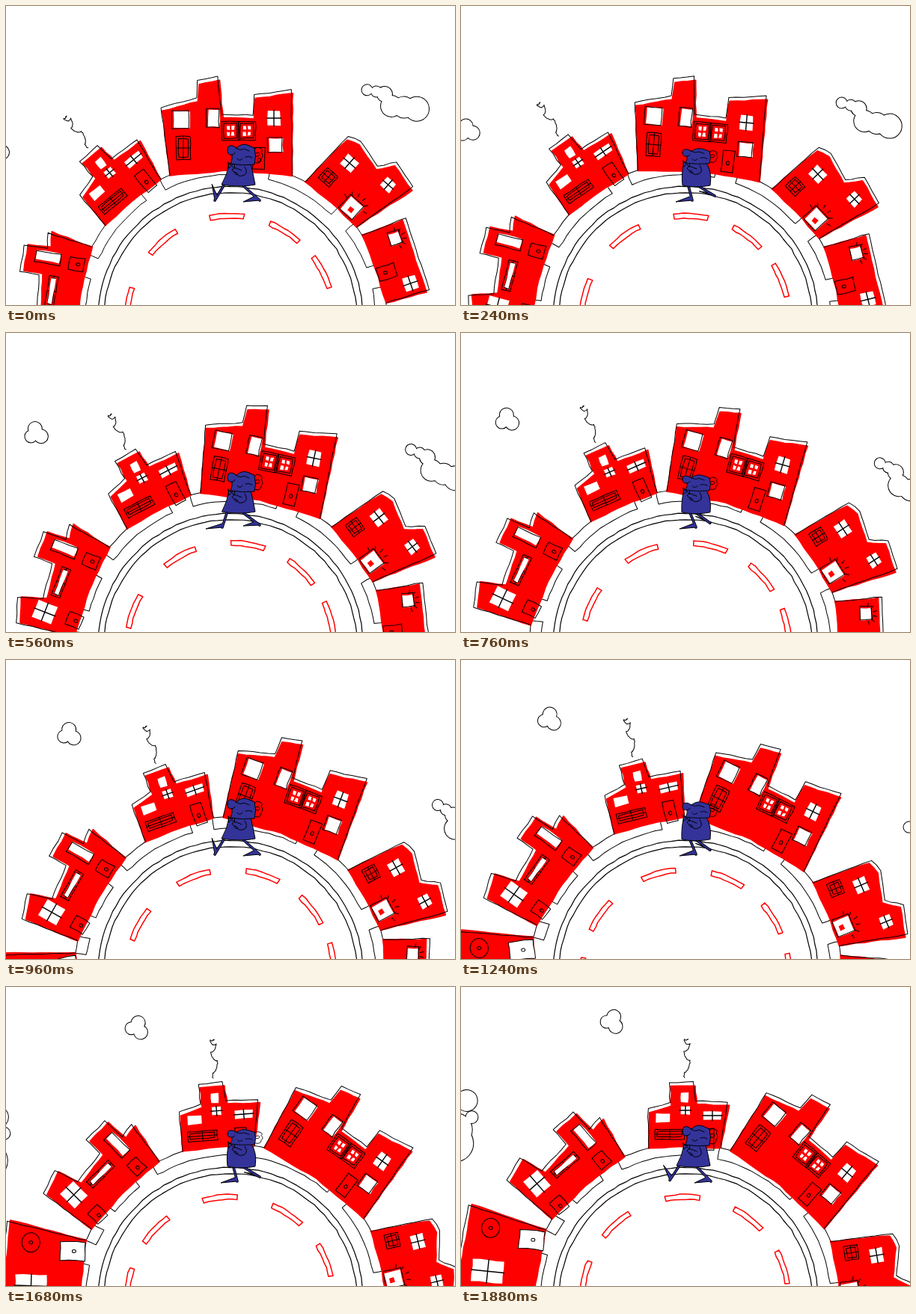
Write an HTML page with a canvas that moves like this. It is 600 px wide and 400 px high and loops after 1.92 s.

```html
<!DOCTYPE html>
<html>
<head>
<meta charset="utf-8">
<style>
html, body { margin: 0; width: 100%; height: 100%; overflow: hidden; background: #fff }
canvas { display: block }
</style>
</head>
<body>
<canvas id="stage" width="600" height="400"></canvas>
<script>
const c = document.getElementById('stage').getContext('2d');
const CX = 300, CY = 419, GROUND = 209, KERB = 194, RAD = Math.PI / 180;
const SPEED = 0.021; // degrees per ms
const RED = '#f00', BLUE = '#339', INK = '#000', WHITE = '#fff';
const LOOP = 1920, STEP = 40, STRIDE = 960;

let seed;
const random = () => (seed = seed * 16807 % 2147483647) / 2147483647;
const shake = n => (random() - .5) * n;
const clamp = v => Math.max(0, Math.min(1, v));
const smooth = v => (v = clamp(v)) * v * (3 - 2 * v);

function paint(path, fill, line, width = 1) {
  if (fill) { c.fillStyle = fill; c.fill(path); }
  if (line) { c.strokeStyle = line; c.lineWidth = width; c.stroke(path); }
}
const draw = (d, ...style) => paint(new Path2D(d), ...style);

// A line through the points with the small tremble of a hand.
function sketch(points, fill, line, width) {
  const p = new Path2D();
  points.forEach(([x, y], i) => {
    if (!i) return p.moveTo(x, y);
    const [px, py] = points[i - 1];
    const n = Math.ceil(Math.hypot(x - px, y - py) / 12);
    for (let k = 1; k <= n; k++)
      p.lineTo(px + (x - px) * k / n + shake(1.2), py + (y - py) * k / n + shake(1.2));
  });
  paint(p, fill, line, width);
}

function local(x, y, degrees, inner) {
  c.save();
  c.translate(x, y);
  c.rotate(degrees * RAD);
  inner();
  c.restore();
}

const polar = (r, a) => [r * Math.sin(a * RAD), -r * Math.cos(a * RAD)];
function ring(r, a, b) {
  const n = Math.ceil(Math.abs(b - a) / 3);
  return Array.from({ length: n + 1 }, (_, i) => polar(r, a + (b - a) * i / n));
}

// House parts; x and y give the middle, with y = 0 at street level.
function box(x, y, w, h, fill, line) {
  const l = x - w / 2, r = x + w / 2, t = y - h / 2, b = y + h / 2;
  sketch([[l, t], [r, t], [r, b], [l, b], [l, t]], fill, line);
}
function plain(x, y, w, h) {
  box(x, y, w, h, WHITE);
  box(x - 2, y, w + 2, h + 2, null, INK);
}
function cross(x, y, w, h) {
  box(x, y, w, h, WHITE);
  draw(`M${x} ${y - h / 2 - 1}v${h + 2}M${x - w / 2 - 1} ${y}h${w + 2}`, null, INK, 1.4);
}
function lattice(x, y, w, h) {
  box(x, y, w, h, null, INK);
  box(x, y, w - 6, h - 6, null, INK);
  draw(`M${x} ${y - h / 2}v${h}M${x - w / 2} ${y}h${w}`, null, INK);
}
function door(x, y, w, h, fill) {
  box(x, y, w, h, fill, INK);
  draw(`M${x - 2} ${y + 2}a2 2.5 0 1 0 4 0a2 2.5 0 1 0 -4 0`, null, INK);
}
function shutters(x, y) {
  for (const side of [-1, 1]) {
    const m = x + side * 11;
    box(m, y, 23, 25, null, INK);
    box(m, y, 18, 20, null, INK);
    for (const i of [-3, 3]) for (const j of [-4, 4]) box(m + i, y + j, 4, 5, WHITE);
  }
}
function smoke(x, y) {
  const trail = [];
  for (let s = 0; s <= 1; s += .02) {
    const turn = 18 * Math.sqrt(s);
    trail.push([x + 4 * Math.sin(turn), y + 55 * s + 2 * Math.cos(2 * turn)]);
  }
  sketch(trail, null, INK);
}
function rays(x, y, r) {
  for (let a = -75; a <= 75; a += 30) {
    const [dx, dy] = polar(1, a);
    draw(`M${x + r * dx} ${y + r * dy}l${5 * dx} ${5 * dy}`, null, INK);
  }
}

// angle: place on the ring at the start; feet: ends of the base;
// roof: corners from left to right; doors: their middles
const houses = [
  { angle: 0, feet: [-81, 82], doors: [38],
    roof: [[-91, -69], [-43, -82], [-42, -105], [-15, -111], [-10, -60], [32, -59], [33, -86], [83, -93]],
    parts() {
      plain(-65, -58, 21, 22);
      plain(-22, -60, 15, 23);
      lattice(-63, -20, 19, 31);
      shutters(11, -43);
      cross(58, -60, 17, 20);
      plain(61, -24, 18, 18);
      door(38, -6, 16, 29);
    } },
  { angle: -39.5, feet: [-49, 47], doors: [30],
    roof: [[-48, -42], [-19, -50], [-19, -77], [13, -78], [15, -53], [58, -51]],
    parts() {
      box(-1, -62, 10, 13, WHITE);
      cross(0, -45, 13, 11);
      box(-30, -35, 19, 12, WHITE);
      cross(36, -38, 24, 11);
      lattice(-21, -13, 39, 13);
      door(30, -6, 15, 29);
      smoke(2, -142);
    } },
  { angle: -80.6, feet: [-63, 65], doors: [39, -43],
    roof: [[-72, -64], [-40, -75], [-29, -43], [19, -48], [19, -74], [54, -74], [56, -43], [76, -46]],
    parts() {
      plain(43, -45, 13, 32);
      lattice(-2, -33, 41, 12);
      box(-2, -33, 34, 6, WHITE);
      cross(-47, -39, 24, 28);
      door(39, -6, 17, 20);
      door(-43, 2, 18, 20);
    } },
  { angle: -123.5, feet: [-70, 74], doors: [59],
    roof: [[-80, -85], [5, -95], [98, -88]],
    parts() {
      draw('M56 -60a13 12 0 1 0 26 0a13 12 0 1 0 -26 0', null, INK);
      door(69, -62, 0, 0);
      cross(11, -58, 30, 42);
      door(59, -4, 25, 33, WHITE);
    } },
  { angle: 41, feet: [-45, 46], doors: [25],
    roof: [[-40, -74], [-23, -80], [16, -69], [31, -90], [70, -80]],
    parts() {
      cross(-17, -53, 19, 17);
      lattice(-26, -20, 19, 18);
      cross(41, -65, 16, 15);
      plain(25, -10, 22, 22);
      box(25, -7, 7, 6, RED);
      rays(25, -12, 15);
    } },
  { angle: 71, feet: [-49, 47], doors: [8.5],
    roof: [[-50, -51], [51, -50]],
    parts() {
      plain(-30, -34, 16, 14);
      rays(-30, -34, 10);
      cross(33, -34, 19, 18);
      door(8.5, -9, 18, 25);
    } }
];

function house({ feet, roof, parts }) {
  const [left, right] = feet.map(x => [x, GROUND - Math.sqrt(GROUND ** 2 - x * x)]);
  sketch([left, ...roof, right, [0, left[1] * .6], left], RED, RED, 2);
  sketch([left, ...roof.map(([x, y]) => [x - 2, y - 5]), right], null, INK);
  parts();
}

// Overlapping circles [x, y, r], of which only the outline remains
function cloud(lumps) {
  for (const style of [[null, INK, 2], [WHITE]])
    for (const [x, y, r] of lumps) {
      const p = new Path2D();
      p.arc(x, y, r, 0, 7);
      paint(p, ...style);
    }
}

const at = (angle, height) => polar(GROUND + height, angle);
function clouds() {
  local(...at(38, 157), 38, () =>
    cloud([[-45, 12, 7], [-34, 6, 7], [-23, 2, 10], [-6, 9, 14], [8, 0, 14], [23, -9, 16]]));
  local(...at(-54.4, 175), -54.4, () => cloud([[-6, -3, 8], [5, -7, 9], [4, 6, 9]]));
  local(...at(-87.5, 175), -87.5, () => cloud([[3, -12, 14], [-9, 8, 8], [-36, 3, 22], [-50, 15, 24]]));
}

function pavement() {
  sketch(ring(GROUND, -140, 110), null, INK);
  const doors = houses.flatMap(h => h.doors.map(x => h.angle + x / GROUND / RAD)).sort((a, b) => a - b);
  [-145, ...doors].forEach((a, i) => {
    const from = a + 4.5, to = (doors[i] ?? 115) - 4;
    sketch([polar(212, from), ...ring(KERB, from, to), polar(212, to)], null, INK);
  });
}

const dashes = [-117, -82, -41, -2, 31.7, 62.7];
function dash(a) {
  const outer = ring(141.5, a - 9.5, a + 9.5), inner = ring(135, a + 9.5, a - 9.5);
  sketch([...outer, ...inner, outer[0]], null, RED, 1.5);
}

function world(t) {
  seed = 7;
  local(CX, CY, t * SPEED, () => {
    pavement();
    for (const h of houses) local(...polar(GROUND, h.angle), h.angle, () => house(h));
    dashes.forEach(dash);
    clouds();
  });
  local(CX, CY, 0, () => [169.5, 177.5].forEach(r => sketch(ring(r, -110, 110), null, INK, 1.2)));
}

// phase 0 to .5: the foot stands and drifts back; .5 to 1: it swings forward
function leg(phase) {
  const swing = clamp(phase * 2 - 1);
  const x = phase < .5 ? 279 + 120 * phase : 339 - 60 * smooth((swing - .5) / .42);
  const y = 260 - 6 * Math.sin(Math.PI * swing);
  const lift = 80 * (phase < .5 ? clamp(1 - phase / .08) : swing * swing) * RAD;
  const hx = 304 + (x - 309) * .45, hy = 241;
  const shin = `M${hx} ${hy}L${x} ${y}`;
  draw(shin, null, INK, 3.6);
  draw(`M${x} ${y}l${-22 * Math.cos(lift)} ${2 - 24 * Math.sin(lift)}L${x + (hx - x) * .3} ${y + (hy - y) * .3}z`, BLUE, INK);
  draw(shin, null, BLUE, 1.8);
}

function walker(t) {
  const phase = t / STRIDE % 1;
  const squat = Math.sin(2 * Math.PI * phase) ** 4;
  leg((phase + .5) % 1);
  leg(phase);
  local(314, 211 - 2 * squat, 0, () => {
    const b = 28 + 3 * squat, l = -26 + 8 * squat;
    draw(`M-16 0H13Q${16 + 6 * squat} 12 19 ${b}Q0 ${b + 4} ${l} ${b}Q${-18 - 2 * squat} 14 -16 0z`, BLUE, INK);
    draw('M5 4Q11 14 2 16Q-4 18 -6 12M-6 12q-5 -1 -6 -4q3 -4 8 -1l5 2M-9 12q2 4 5 2M-17 -2l8 8l1 -8l-8 8z', null, INK);
  });
  local(315, 199 + 2 * squat, 0, () => {
    c.scale(1, 1 - .25 * squat);
    draw('M17 -6q2 -6 7 -3q5 2 2 6q4 4 0 8q0 6 -5 6q-5 0 -5 -5M19 -2q4 -2 5 1q0 4 -5 3', null, INK);
    draw('M-19 -6Q-19 -14 -12 -12L-7 -9Q0 -16 8 -13L17 -9Q20 2 17 13Q0 15 -15 12Q-12 5 -13 0Q-19 1 -19 -6z', BLUE, INK);
    draw('M-8 -9Q-2 -5 3 -8L10 -5M-6 5q3 5 7 0M-13 0q3 0 4 -3M5 3q5 -2 9 1', null, INK);
  });
}

function frame() {
  const t = Math.floor(performance.now() % LOOP / STEP) * STEP;
  c.fillStyle = WHITE;
  c.fillRect(0, 0, 600, 400);
  c.lineJoin = c.lineCap = 'round';
  world(t);
  walker(t);
  requestAnimationFrame(frame);
}
frame();
</script>
</body>
</html>
```
